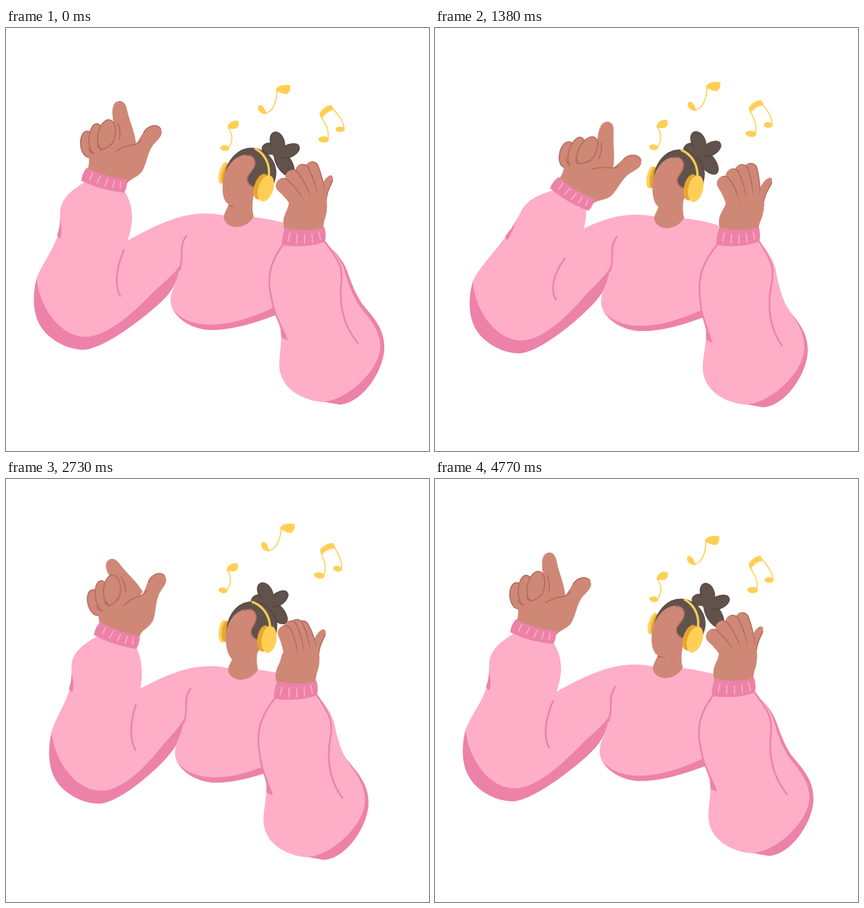
These frames come from a looping animation (748 by 748 pixels, 4.8 s). An HTML page:

```html
<!DOCTYPE html>
<html lang="en">
<head>
<meta charset="utf-8">
<title>Listening to music</title>
<style>
  html, body { margin: 0; height: 100%; overflow: hidden; background: #fff; }
  svg { display: block; width: 100vw; height: 100vh; }

  .pink { fill: #ffaec8; }
  .rose { fill: #ed82a8; }
  .skin { fill: #cf8876; }
  .shadow { fill: #b36b60; }
  .hair { fill: #61524b; stroke: #4e413c; stroke-width: 1.5; }
  .sun { fill: #ffcf55; }
  .amber { fill: #e5a731; }
  .line { fill: none; stroke-linecap: round; stroke-linejoin: round; }
  .fold { stroke: #ed82a8; stroke-width: 3; }
  .rib { stroke: #ffaec8; stroke-width: 2; }
  .mark { stroke: #b36b60; stroke-width: 2; }
  .knuckle { fill: #cf8876; stroke: #b36b60; stroke-width: 2; }
  .stem { stroke: #ffcf55; stroke-width: 2; }
  .finger { stroke: #cf8876; stroke-width: 24; }
  .finger.edge { stroke: #b36b60; }

  .sway, .bob, .head, .turn, .bun, .note {
    animation: var(--move) var(--half) ease-in-out infinite alternate;
  }
  .sway { --move: sway; --half: 600ms; }
  .bob { --move: bob; --half: 300ms; }
  .head, .turn, .bun { --half: 600ms; animation-delay: -150ms; }
  .head { --move: nod; transform-origin: 430px 258px; }
  .bun { --move: swing; transform-origin: 485px 218px; }
  .turn { --move: turn; }
  .note { --half: 800ms; }
  .n1 { --move: n1; animation-delay: -80ms; transform-origin: 397px 190px; }
  .n2 { --move: n2; transform-origin: 473px 127px; }
  .n3 { --move: n3; animation-delay: -1500ms; transform-origin: 573px 172px; }

  @keyframes sway { to { transform: translate(13px, 0); } }
  @keyframes bob { to { transform: translate(0, 3px); } }
  @keyframes nod { from { transform: translate(1px, 0) rotate(1.7deg); } to { transform: translate(-6px, 3px) rotate(-10deg); } }
  @keyframes swing { from { transform: translate(2px, 0); } to { transform: translate(-15px, -2px) rotate(-2deg); } }
  @keyframes turn { to { transform: translate(var(--shift), 0); } }
  @keyframes n1 { from { transform: translate(0, 1px); } to { transform: translate(-5px, -32px) rotate(5deg); } }
  @keyframes n2 { to { transform: translate(10px, -36px) rotate(6deg); } }
  @keyframes n3 { from { transform: translate(0, 2px); } to { transform: translate(-4px, -28px) rotate(14deg); } }
</style>
</head>
<body>
<svg viewBox="0 0 748 748">
  <g class="note n1">
    <ellipse class="sun" cx="387" cy="212" rx="8" ry="5" transform="rotate(8 387 212)"/>
    <path class="line stem" d="M392 213C401 204 402 190 394 177"/>
    <path class="sun" d="M392 178C391 168 402 161 411 164C413 171 411 178 403 178C398 178 395 177 392 178Z"/>
  </g>
  <g class="note n2">
    <path class="sun" d="M446 138C450 134 456 137 460 149C464 151 461 153 457 152C449 151 444 145 446 138Z"/>
    <path class="line stem" d="M458 151C472 149 480 130 479 107"/>
    <path class="sun" d="M477 111C479 102 490 99 502 101C504 107 502 115 496 117C489 117 483 113 477 111Z"/>
  </g>
  <g class="note n3">
    <path class="sun" d="M554 151C558 143 566 136 575 135L581 144C570 145 564 151 558 160Z"/>
    <path class="line stem" d="M557 156C566 170 573 180 569 197M577 140C586 152 598 162 598 179"/>
    <ellipse class="sun" cx="562" cy="196" rx="9.500" ry="5.500"/>
    <ellipse class="sun" cx="591" cy="178" rx="8" ry="5"/>
  </g>

  <g data-warp="left">
    <path class="rose" d="M140 272C118 286 98 300 96 325C95 345 96 358 88 376C78 400 62 420 53 443C46 470 46 500 57 522C70 548 103 568 135 569C170 569 240 515 270 488C290 470 300 456 306 430L316 376L230 374L213 378C220 362 224 340 222 326C221 310 215 298 209 288Z"/>
    <path class="pink" d="M140 272C118 286 98 300 96 325C95 345 96 358 88 376C78 400 62 420 53 443C60 500 98 546 140 546C180 546 230 498 262 465C285 445 300 432 308 419L316 376L230 374L213 378C220 362 224 340 222 326C221 310 215 298 209 288Z"/>
    <path class="rose" d="M96 340C98 352 99 362 96 372C93 372 91 369 90 366C93 358 95 350 96 340Z"/>
    <path class="line fold" d="M208 392C194 425 190 455 201 474"/>
  </g>

  <g class="sway"><g class="bob">
    <path class="pink" d="M213 377C265 348 308 328 352 328Q372 328 388 332L436 334Q470 338 496 346L545 385L520 490L478 507C440 522 400 534 362 534C325 533 291 510 291 481C292 464 299 456 303 441Q308 424 308 412L230 408Z"/>
    <path class="rose" d="M297 499C320 530 385 540 486 488L484 505C440 522 400 534 362 534C330 533 306 516 297 499Z"/>
    <path class="line fold" d="M319 367C304 389 316 402 307 428"/>
    <path class="skin" d="M397 285C400 312 386 322 385 335C387 347 398 352 407 352C422 352 434 342 438 333C434 318 436 305 440 285Z"/>
    <path class="shadow" d="M394 309L415 309Q408 317 394 316Z"/>
    <g class="head">
      <g class="bun">
        <ellipse class="hair" cx="466" cy="213" rx="13" ry="10"/>
        <ellipse class="hair" cx="492" cy="239" rx="13" ry="26" transform="rotate(-32 492 239)"/>
        <ellipse class="hair" cx="501" cy="217" rx="19" ry="11" transform="rotate(-25 501 217)"/>
        <ellipse class="hair" cx="480" cy="201" rx="12" ry="18" transform="rotate(-20 480 201)"/>
        <circle cx="482" cy="217" r="13" fill="#61524b"/>
      </g>
      <g class="turn" style="--shift: -4px">
        <ellipse class="sun" cx="385" cy="256" rx="7.500" ry="20" transform="rotate(15 385 256)"/>
        <ellipse class="amber" cx="390" cy="257" rx="7" ry="19" transform="rotate(15 390 257)"/>
      </g>
      <path class="hair" d="M387 265C390 229 414 212 434 212C460 213 479 235 477 260Q475 272 468 287L440 283Z"/>
      <g class="turn" style="--shift: 4px">
        <path class="skin" d="M384 268C388 247 402 226 425 224C438 224 442 236 440 242C438 252 427 257 427 266C427 276 433 280 444 283C437 304 422 312 408 314C388 316 380 300 384 268Z"/>
        <path class="line mark" stroke-width="3" d="M413 229C428 222 437 225 439 234C442 248 430 254 426 264C425 273 431 279 440 282"/>
      </g>
      <path class="skin" d="M384 268C388 247 402 226 424 224L426 290L408 314C388 316 380 300 384 268Z"/>
      <path class="line" stroke="#ffcf55" stroke-width="4" d="M441 213C459 223 468 243 464 265"/>
      <ellipse class="amber" cx="451" cy="280" rx="12" ry="23.500" transform="rotate(18 451 280)"/>
      <ellipse class="sun" cx="459.500" cy="283" rx="13" ry="24" transform="rotate(18 459.500 283)"/>
    </g>
  </g></g>

  <g data-warp="back">
    <path class="rose" d="M545 658L590 666C630 664 669 605 669 565C669 530 648 510 630 488C612 460 608 440 600 422C590 402 575 388 562 380L530 500Z"/>
  </g>
  <g data-warp="front">
    <path class="pink" d="M492 380C474 402 466 425 466 450C466 485 482 510 486 540C488 565 481 585 484 605C490 640 525 657 555 661C600 663 662 605 662 562C660 530 640 512 624 490C608 465 602 440 597 424C588 402 574 388 562 377Z"/>
    <path class="rose" d="M486 532C490 538 496 545 499 552Q491 550 487 546Z"/>
    <path class="line fold" d="M490 383C455 430 466 460 472 490C477 512 488 528 495 547"/>
    <path class="line fold" d="M564 378C592 415 595 425 593 450C588 495 600 530 622 557"/>
  </g>

  <g id="leftCuff">
    <g id="leftHand">
      <path id="pointer" class="skin" d="M196 185C191 165 187 138 198 131C208 126 215 132 217 145C221 168 230 185 231 207L205 220Z"/>
      <path class="skin" d="M146 222C149 236 147 243 142 258L213 278C216 268 234 266 242 253C250 238 250 225 260 210C268 200 277 195 277 185C275 173 258 170 248 181C241 189 236 201 229 208L203 178L165 185Z"/>
      <path class="line mark" d="M245 186C252 174 268 170 275 180M186 231C193 214 214 209 229 207Q236 205 240 199M199 169Q205 182 202 197"/>
      <ellipse class="knuckle" cx="146" cy="205" rx="13" ry="23" transform="rotate(-4 146 205)"/>
      <ellipse class="knuckle" cx="161" cy="196" rx="13" ry="27" transform="rotate(3 161 196)"/>
      <ellipse class="knuckle" cx="179" cy="189" rx="15" ry="27" transform="rotate(14 179 189)"/>
      <path class="skin" d="M147 226Q175 214 196 203L195 236L150 240Z"/>
      <path class="line mark" d="M163 207Q165 215 172 214Q180 213 186 205M147 213Q150 222 157 221"/>
    </g>
    <path class="rose" d="M143 247Q177 264 214 268Q215 282 209 291Q168 287 133 270Q135 255 143 247Z"/>
    <path class="line rib" d="M153 256L148 268M167 262L161 274M180 267L175 279M192 270L189 282M203 272L202 283"/>
  </g>

  <g id="rightCuff">
    <g id="rightPalm">
      <path class="skin" d="M552 290C560 278 563 266 573 261C580 260 580 268 577 275C570 285 568 295 566 310Z"/>
      <path class="line mark" d="M567 303C568 287 575 280 578 270"/>
      <path class="skin" d="M495 362C484 338 497 325 499 316L502 305L520 285L561 278C570 300 570 322 564 338C561 348 561 354 562 364Z"/>
    </g>
    <g id="fingers"></g>
    <path class="rose" d="M494 353Q530 362 563 352Q567 365 564 378Q530 390 488 384Q487 368 494 353Z"/>
    <path class="line rib" d="M502 363L499 377M515 365L514 380M528 366V381M541 364L542 379M553 361L556 374"/>
  </g>
</svg>

<script>
const $ = id => document.getElementById(id);
const PERIOD = 2400;

const lerp = (a, b, k) => a + (b - a) * k;
const ramp = (from, to, v) => Math.max(0, Math.min(1, (v - from) / (to - from)));

const warped = [...document.querySelectorAll('[data-warp] path')].map(el => ({
  el, shape: el.getAttribute('d'), kind: el.parentNode.dataset.warp
}));

const stroke = name => {
  const el = document.createElementNS('http://www.w3.org/2000/svg', 'path');
  el.setAttribute('class', 'line finger ' + name);
  $('fingers').append(el);
  return el;
};
// Little finger first, index finger on top
const fingers = [1, 2 / 3, 1 / 3, 0].map(k => ({ k, edge: stroke('edge'), body: stroke('') }));

const setTransform = (id, value) => $(id).setAttribute('transform', value);

function draw(ms) {
  // Shared oscillators of one dance cycle; all are about zero at rest
  const a = ms % PERIOD / PERIOD * 2 * Math.PI;
  const rise = n => (1 - Math.cos(n * a)) / 2;
  const arc = rise(1), sway = rise(2), bob = rise(4);
  const side = Math.sin(a), twist = Math.sin(2 * a), flick = Math.sin(3 * a);
  const curl = ((1 + Math.cos(a - 1.178)) / 2) ** 8;

  const cuffL = { x: 72 * arc + 13 * sway + 3 * side, y: 19 * arc + 4 * bob + 4 * side - 5 * flick, turn: 16 * arc };
  const elbowL = { x: 6 * arc + 11 * bob + 20 * curl, y: 5 * bob + 4 * side - 5 * flick };
  const cuffR = { x: 2 * sway - 20 * side, y: 2 * bob + 3.5 * side };
  const elbowR = { x: 6 * flick - 17 * side - 4 * twist - 6 * sway - 11 * bob, y: 5 * bob + 4 * side + 2 * sway - 3 * flick };
  const handTurn = 15 * arc + 2 * bob - 18 * curl;

  const angle = cuffL.turn * Math.PI / 180, cos = Math.cos(angle), sin = Math.sin(angle);
  const sleeve = (x, y, from, to) => {
    const k = ramp(from, to, y);
    return [x + lerp(cuffR.x, elbowR.x, k), y + lerp(cuffR.y, elbowR.y, k)];
  };
  const warp = {
    // The forearm turns with the cuff, the armpit follows the torso, the rest the elbow
    left(x, y) {
      const dx = x - 173, dy = y - 268;
      const s = ramp(200, 310, x), c = (1 - s) * ramp(450, 320, y), e = 1 - s - c;
      return [
        c * (173 + cuffL.x + dx * cos - dy * sin) + s * (x + 13 * sway) + e * (x + elbowL.x),
        c * (268 + cuffL.y + dx * sin + dy * cos) + s * (y + 3 * bob) + e * (y + elbowL.y)
      ];
    },
    front: (x, y) => sleeve(x, y, 380, 570),
    back: (x, y) => sleeve(x, y, 340, 450)
  };
  for (const { el, shape, kind } of warped) {
    el.setAttribute('d', shape.replace(/([\d.]+) ([\d.]+)/g, (_, x, y) => warp[kind](+x, +y).join(' ')));
  }

  setTransform('leftCuff', `translate(${cuffL.x} ${cuffL.y}) rotate(${cuffL.turn} 173 268)`);
  setTransform('leftHand', `rotate(${handTurn - cuffL.turn} 173 268)`);
  setTransform('pointer', `rotate(${-20 * curl - 2 * arc} 212 200)`);
  setTransform('rightCuff', `translate(${cuffR.x} ${cuffR.y})`);
  setTransform('rightPalm', `rotate(${7 * bob - 8 * curl} 526 368)`);

  for (const { k, edge, body } of fingers) {
    const bx = 519 + 34 * k, by = 316 - 12 * k;
    const x = lerp(489 + 18 * bob, 541 + 10 * bob - 17 * curl, k);
    const y = lerp(279 - 6 * bob - 7 * curl, 249 + 5 * bob + 6 * curl, k) - 24 * k * (1 - k);
    const mx = lerp(x, bx, .5) + 3, my = lerp(y, by, .5) - 3;
    edge.setAttribute('d', `M${x + 1.5} ${y - 1.5}Q${mx + 1.5} ${my - 1.5} ${lerp(x, bx, .8) + 1.5} ${lerp(y, by, .8) - 1}`);
    body.setAttribute('d', `M${x} ${y}Q${mx} ${my} ${bx} ${by}`);
  }
}

let start;
function tick(now) {
  start ??= now;
  draw(now - start);
  requestAnimationFrame(tick);
}
draw(0);
requestAnimationFrame(tick);
</script>
</body>
</html>
```
